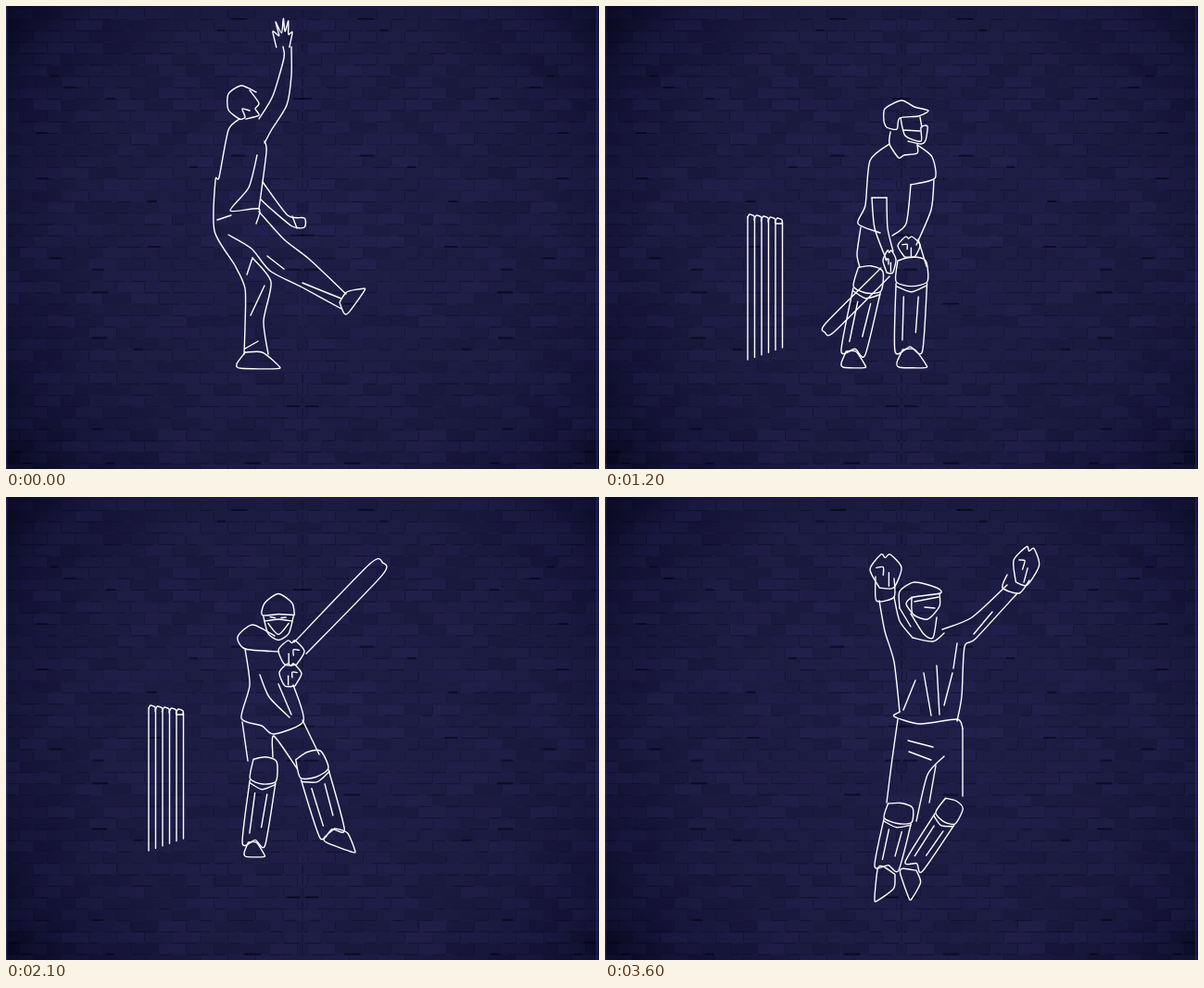
An HTML page with a canvas for the animation above (3900 ms loop, 640x500 px).

```html
<!DOCTYPE html>
<html lang="en">
<head>
<meta charset="utf-8">
<title>Cricket line drawing</title>
<style>
html, body { margin: 0; width: 100%; height: 100%; overflow: hidden; background: #12112f; }
canvas { display: block; }
</style>
</head>
<body>
<canvas id="stage" width="640" height="500"></canvas>
<script>
const W = 640, H = 500, STEP = 300;
const ctx = document.getElementById("stage").getContext("2d");

// Reusable shapes in a box of 100 by 100
const split = text => text.split(",").map(s => s.trim().split(/\s+/));
const shape = text => split(text).map(s => s.map(Number));
const shapes = {
  shoe: shape("20 0 0 70 10 96 95 98 98 80 60 0 20 0"),
  hand: shape("18 100 0 45 32 60 14 12 45 50 54 0 62 45 80 8 80 55 100 48 85 100"),
  mitt: shape("30 100 0 45 35 0 48 10 64 0 100 40 75 100 30 100, 20 40 42 38 42 62, 60 55 60 95"),
  bat: shape("0 100 0 8 50 0 100 8 100 100"),
  pad: shape("8 4 50 0 92 4 97 26 50 31 3 26 8 4, 4 31 50 37 96 30, 3 28 0 100 45 95 82 100 96 28, 26 42 22 88, 70 42 62 80"),
  helmet: shape("3 46 10 20 50 0 90 20 97 46 50 44 3 46, 6 48 20 86 50 100 80 86 94 48, 10 59 50 55 90 59, 20 64 50 88 80 64, 28 51 42 52, 60 52 74 50")
};

function stamp(name, x, y, w, h, turn = 0) {
  const c = Math.cos(turn * Math.PI / 180), s = Math.sin(turn * Math.PI / 180);
  return shapes[name].map(stroke => stroke.map((v, i) => {
    const k = i - i % 2;
    const px = (stroke[k] / 100 - .5) * w, py = (stroke[k + 1] / 100 - .5) * h;
    return i % 2 ? y + px * s + py * c : x + px * c - py * s;
  }));
}

// Each item is a stroke "x y x y ...", a circle "x y r" or a shape "name x y w h turn"
const draw = text => split(text).flatMap(([first, ...rest]) =>
  first in shapes ? stamp(first, ...rest.map(Number)) : [[first, ...rest].map(Number)]);
const fit = (strokes, sx, dx, sy = 1, dy = 0) => strokes.map(s =>
  s.map((v, i) => i % 2 ? v * sy + dy : s.length === 3 && i === 2 ? v : v * sx + dx));

const windUp = draw(`hand 298.5 29 21 31, 299 44 300 56 288 97 273 122, 308 44 308 75 303 107 287 133 279 148,
  270 93 254 86 240 95 240 112 252 122 258 120 255 111 263 113, 263 91 273 105 269 111 273 118 259 122,
  252 122 240 134 230 185 226 188 225 243 247 280 258 305 258 345 257 376,
  279 146 281 158 273 219, 271 161 262 196 242 221 273 219 270 235,
  277 190 304 226 322 229 322 239 309 238 287 220 275 209, 309 227 314 240`);
const windUpLegs = draw(`273 222 300 252 328 274 367 311, 228 231 243 226, 240 247 265 262 285 286 320 304 362 327, 320 299 362 316, 282 270 300 284,
  shoe 372 316 34 15 -55, 266 272 286 298 278 340 283 376, 266 272 260 290, 279 302 264 334, 258 370 272 362, shoe 272 383 46 18`);

const backArm = draw("hand 315.5 96 19 32, 316 112 334 161 343 196, 323 108 343 137 353 157 362 182, 334 163 353 157");
const lunge = draw(`386 194 392 182 410 179 421 190 420 206 409 221 391 223 383 214 386 194, 394 190 407 193 419 200, 399 199 392 206 400 207,
  362 182 386 193, 343 196 331 213 306 240, 346 200 347 224, 366 202 383 205, 406 222 396 237 367 257,
  306 240 345 244 385 241, 306 240 322 253 367 258, 368 258 382 303 366 335 359 370, 337 278 359 308 341 361, 348 342 346 358,
  shoe 354 377 42 22 8, 306 240 270 292 240 309 208 335, 337 278 285 306 250 322 211 351, 302 278 322 271, 328 264 348 265, shoe 202 354 38 18 114`);
const bowl = fit(lunge, .957, 16.5, 1, -2);
const overArm = draw("352 192 373 148 382 124, 362 180 392 130, 388 118 8");
const release = draw("350 190 370 171 420 176 434 179 424 187 374 185, 525 236 9");

// Stumps with bails
const stumps = [0, 1, 2, 3, 4, 5].flatMap(i => {
  const x = 154 + i * 7.5, y = 228 + i;
  return [[x, y, x, 382 - i * 2.6], i < 5 ? [x, y, x + 2, y - 3, x + 7, y - 1, x + 7, y + 3] : [184, 235, x, 235]];
});

const guard = draw(`301 125 302 111 320 102 334 109 349 113 338 119 318 121 315 133 304 131 301 125,
  319 121 324 140 341 146 341 131 348 130 346 145 341 149 327 146, 322 134 340 135, 340 120 342 131,
  308 136 307 149 317 164 323 161 337 159 337 150, 307 149 286 167 281 215 273 235 297 245,
  288 207 304 207, 288 207 291 240 304 275, 304 207 305 240 311 265, 337 150 353 163 356 186 330 193,
  355 188 352 220 336 258, 330 193 325 235 310 248, mitt 307 276 14 24, mitt 328 260 24 22, bat 270 320 13 92 -135,
  276 239 272 268 275 282, 338 252 347 281, pad 279 328 32 96 10, pad 331 322 36 102, shoe 268 382 26 18, shoe 331 381 32 20`);

const hitter = draw(`helmet 280 126.5 37 50, 284 147 308 135 324 148 316 161 280 164, mitt 266 165 28 26, mitt 267 189 24 24,
  316 161 311 200 320 236 298 244 285 253 253 239 264 200, 300 189 290 213 268 235, 280 199 266 232`);
const stride = draw(`255 240 261 282, 288 278 289 255 314 290, 320 238 338 275, pad 275 325 30 95 6, pad 340 316 34 92 -19,
  shoe 268 378 22 16, shoe 362 367 36 18 20`);
const hit = draw("bat 205 183 19 112 -108, 203 193 11.5, 199 183 206 190 206 203, 203 182 210 201");
const lowBat = draw("bat 242 223 14 66 -143");
const highBat = draw("bat 362 117 18 128 44");

const halfCrouch = draw(`299 319 278 338 280 370 298 402, 301 357 304 390, 300 320 304 336 318 350,
  277 351 260 357, mitt 302 422 24 38, pad 270 392 36 74 -12, shoe 274 436 -32 18`);
const crouch = [...halfCrouch, ...fit(halfCrouch, -1, 631),
  ...draw("helmet 318.5 313.5 40 55, 302 371 318 377 332 371, 304 390 318 389 330 392")];

const grab = draw(`helmet 320.5 221 51 58, 302 235 280 244 274 262, 342 240 360 260 356 296 368 334 335 331 298 320,
  340 254 321 278 300 283, 360 283 325 304 299 303, 274 262 290 268 300 285 282 299, mitt 258 264 30 24, mitt 266 291 28 22, 267 270 7,
  300 307 281 311 322 322 350 326, 303 250 318 262, 298 320 270 328 250 332, 274 368 302 357 310 347, 306 335 320 367 327 382,
  365 336 360 378, 275 330 295 345, pad 261 380 33 98 -6, pad 354 408 34 76 -19, shoe 271 435 28 20, shoe 377 436 36 17`);

const joy = draw(`296 112 302 145 312 178 318 232, 312 108 318 134 332 152, 292 86 293 112 312 108 312 88, mitt 303 80 34 36,
  364 143 396 130 434 95, 445 104 400 153 388 162 385 215 380 242, 434 84 429 98 447 104 458 90, mitt 454 74 28 40 15,
  318 120 318 102 334 92 358 98 362 104 333 108 325 115 331 125, 331 108 332 126 348 132 361 118 361 104,
  334 113 360 108, 345 119 356 120, 330 126 344 148 354 152 358 130, 332 152 354 156 366 147, 318 120 330 140`);
const joyBody = draw(`335 198 322 230, 344 190 352 236, 358 182 361 235, 380 158 376 185, 375 190 366 225, 398 148 418 124,
  318 232 312 237 340 245 380 240 386 250, 316 240 309 290 304 330, 386 250 386 323, 366 280 348 300 336 350, 357 290 350 330,
  327 263 354 270, 328 275 352 284, pad 313 366 32 72 10, pad 357 364 26 84 31, shoe 302 418 38 20 95, shoe 331 416 34 18 70`);

const poses = [
  [windUp, windUpLegs],
  [bowl, overArm],
  [bowl, release],
  [lunge, backArm],
  [stumps, guard],
  [stumps, fit([...hitter, ...stride], 1, -2, 1, -4), lowBat],
  [stumps, hitter, stride, hit],
  [stumps, fit(hitter, -1, 574, 1, 3), fit(stride, 1, 0, 1, 3), highBat],
  [crouch],
  [fit(crouch, 1.47, -142, 1.36, -157)],
  [grab],
  [joy, joyBody, draw("395 9.5 8.5, 391 3 398 9 398 17")],
  [joy, joyBody]
];

function makeWall() {
  const wall = document.createElement("canvas");
  wall.width = W;
  wall.height = H;
  const c = wall.getContext("2d");
  let seed = 11;
  const rnd = () => (seed = seed * 16807 % 2147483647) / 2147483647;
  const glow = c.createRadialGradient(335, 245, 60, 335, 245, 415);
  glow.addColorStop(0, "#1f1e47");
  glow.addColorStop(.55, "#1c1b42");
  glow.addColorStop(.8, "#151438");
  glow.addColorStop(1, "#090921");
  c.fillStyle = glow;
  c.fillRect(0, 0, W, H);

  // Bricks mirrored about the middle
  const both = (x, y, w, h, color) => {
    c.fillStyle = color;
    c.fillRect(x, y, w, h);
    c.fillRect(W - x - w, y, w, h);
  };
  for (let y = 3, row = 0; y < H; y += 12.3, row++) {
    for (let x = row % 2 * -15; x < 320; x += 30) {
      const w = Math.min(29, 320 - x);
      both(x, y, w, 11, `rgba(${rnd() < .5 ? "55,52,115" : "5,5,25"},${rnd() * .13})`);
      both(x, y + 11, w * (.4 + rnd() * .6), 1, `rgba(5,5,25,${.15 + rnd() * .35})`);
      both(x + w, y + 1, 1, 9, `rgba(5,5,25,${rnd() * .3})`);
      if (rnd() < .06) both(x + 3, y + 10, 8 + rnd() * 10, 2, "rgba(3,3,16,.55)");
    }
  }
  c.fillStyle = "rgba(64,60,140,.45)";
  c.fillRect(0, 0, 1.5, H);
  c.fillRect(637, 0, 1.5, H);
  return wall;
}

// Smooth curve through every point
function trace(s) {
  ctx.beginPath();
  if (s.length === 3) ctx.arc(...s, 0, Math.PI * 2);
  else {
    const n = s.length / 2;
    const at = i => {
      const k = Math.max(0, Math.min(n - 1, i)) * 2;
      return [s[k], s[k + 1]];
    };
    ctx.moveTo(...at(0));
    for (let i = 0; i < n - 1; i++) {
      const [a, b, d, e] = [at(i - 1), at(i), at(i + 1), at(i + 2)];
      ctx.bezierCurveTo(b[0] + (d[0] - a[0]) / 8, b[1] + (d[1] - a[1]) / 8,
        d[0] - (e[0] - b[0]) / 8, d[1] - (e[1] - b[1]) / 8, ...d);
    }
  }
  ctx.stroke();
}

const wall = makeWall();
ctx.strokeStyle = "#fff";
ctx.lineWidth = 1.4;
ctx.lineCap = ctx.lineJoin = "round";

const start = performance.now();
let shown = -1;
function frame() {
  const step = Math.floor((performance.now() - start) / STEP) % poses.length;
  if (step !== shown) {
    shown = step;
    ctx.drawImage(wall, 0, 0);
    poses[step].flat().forEach(trace);
  }
  requestAnimationFrame(frame);
}
frame();
</script>
</body>
</html>
```
